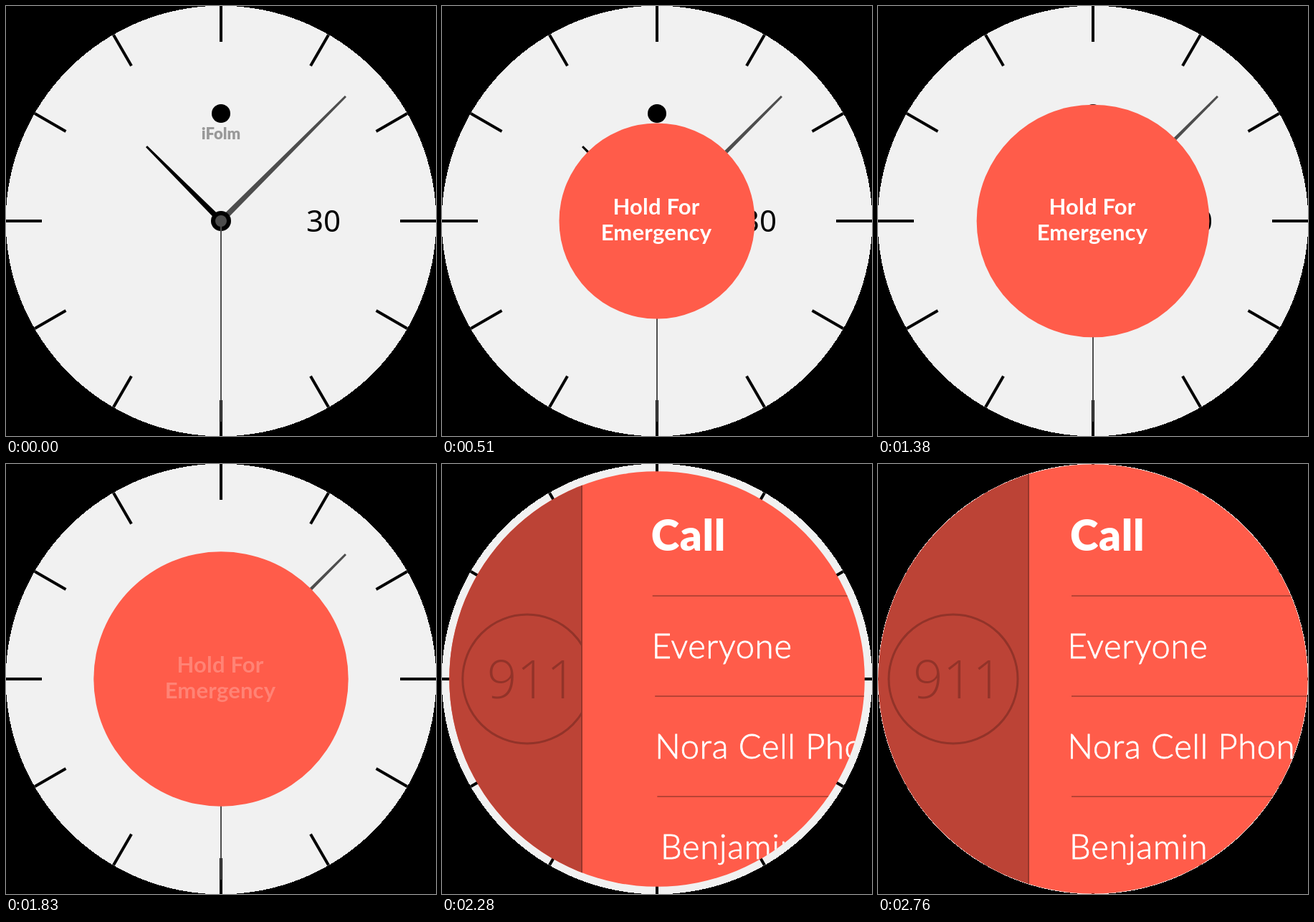
An HTML page that plays this animation: 600 px wide and 600 px high, repeating every 4500 ms.

```html
<!DOCTYPE html>
<html lang="en">
<head>
<meta charset="utf-8">
<title>Emergency watch face</title>
<style>
  html, body { margin: 0; width: 100%; height: 100%; overflow: hidden; background: #000; }
  svg { display: block; width: 100%; height: 100%; }
  text { font-family: Lato, sans-serif; }
  .middle { text-anchor: middle; }
  .title { font-size: 60px; font-weight: 900; letter-spacing: .7px; }
  .row { font-size: 47px; font-weight: 300; letter-spacing: .8px; stroke: #fff; stroke-width: .8px; }
  .number { font: 300 73px 'Open Sans', 'Noto Sans', sans-serif; }
  .rule { fill: #b94335; }
</style>
</head>
<body>
<svg viewBox="0 0 600 600">
  <defs>
    <clipPath id="reveal"><circle id="revealCircle" cx="300" cy="300" r="0"/></clipPath>
    <clipPath id="panelClip"><rect id="panelArea" width="0" height="600"/></clipPath>
  </defs>

  <circle cx="300" cy="300" r="300.3" fill="#f1f1f1" shape-rendering="crispEdges"/>
  <g id="ticks" stroke="#000" stroke-width="4"></g>
  <circle cx="300" cy="150" r="13"/>
  <text class="middle" x="300" y="186" font-size="22" font-weight="900" fill="#999">iFolm</text>
  <text class="middle" x="443" y="315" font-size="42" style="font-family:'Noto Sans',sans-serif">30</text>
  <path d="M296 300L298.5 54H301.5L304 300Z" fill="#4d4d4d" transform="rotate(45 300 300)"/>
  <path d="M296 300L298.5 153H301.5L304 300Z" transform="rotate(-45 300 300)"/>
  <circle cx="300" cy="300" r="14"/>
  <circle cx="300" cy="300" r="8" fill="#4d4d4d"/>
  <path d="M300 300V580" stroke="#4d4d4d" stroke-width="2"/>

  <g clip-path="url(#reveal)">
    <rect width="600" height="600" fill="#ff5c4a"/>
    <g id="prompt" class="middle" fill="#fff" font-size="31" font-weight="700" letter-spacing=".2">
      <text x="299" y="291">Hold For</text>
      <text x="299" y="327">Emergency</text>
    </g>
    <g clip-path="url(#panelClip)">
      <rect width="600" height="600" fill="#bc4336"/>
      <g id="dial" fill="#923329">
        <circle cx="105" cy="300" r="90" fill="none" stroke="#923329" stroke-width="3"/>
        <text class="number" x="49" y="327">911</text>
      </g>
    </g>
    <rect id="panelEdge" width="2" height="600" fill="#96362b"/>
    <g fill="#fff">
      <text data-delay="0" class="title" x="268" y="121">Call</text>
      <rect data-delay="0" class="rule" x="270" y="183" width="400" height="2"/>
      <text data-delay="27" class="row" x="264.5" y="271">Everyone</text>
      <rect data-delay="21" class="rule" x="270" y="323" width="400" height="2"/>
      <text data-delay="50" class="row" x="264.5" y="411">Nora Cell Phone</text>
      <rect data-delay="38" class="rule" x="270" y="463" width="400" height="2"/>
      <text data-delay="73" class="row" x="267" y="551">Benjamin</text>
    </g>
  </g>
</svg>
<script>
const LOOP = 4500, STEP = 30;
const BUTTON_RADIUS = 162.3, FULL_RADIUS = 299.6, GROW_TIME = 850;
const OPEN_START = 1340, OPEN_TIME = 1360, FADE_TIME = 880;
const byId = id => document.getElementById(id);
const slides = [...document.querySelectorAll('[data-delay]')];

byId('ticks').innerHTML = Array.from({ length: 12 }, (_, i) =>
  `<path d="M300 0V50" transform="rotate(${i * 30} 300 300)"/>`).join('');

// Symmetric cubic Bezier ease (.86, 0, .14, 1), solved by bisection.
function ease(x) {
  if (x <= 0) return 0;
  if (x >= 1) return 1;
  const bezier = (s, a, b) => 3 * (1 - s) ** 2 * s * a + 3 * (1 - s) * s * s * b + s ** 3;
  let low = 0, high = 1;
  for (let i = 0; i < 30; i++) {
    const mid = (low + high) / 2;
    if (bezier(mid, 0.86, 0.14) < x) low = mid; else high = mid;
  }
  return bezier(low, 0, 1);
}

const shift = (element, dx) => element.setAttribute('transform', `translate(${dx} 0)`);

function render(t) {
  const opened = delay => ease((t - OPEN_START - delay) / OPEN_TIME);
  const open = opened(0);
  const panelWidth = Math.round(211 * open);

  byId('revealCircle').setAttribute('r',
    BUTTON_RADIUS * ease(t / GROW_TIME) + (FULL_RADIUS - BUTTON_RADIUS) * open);
  byId('prompt').setAttribute('opacity', 1 - ease((t - OPEN_START) / FADE_TIME));
  byId('panelArea').setAttribute('width', panelWidth);
  shift(byId('panelEdge'), panelWidth - 2);
  shift(byId('dial'), 193 * (1 - open));
  for (const item of slides) shift(item, 332 * (1 - opened(+item.dataset.delay)));
}

const start = performance.now();
function frame() {
  const elapsed = (performance.now() - start) % LOOP;
  render(Math.floor(elapsed / STEP) * STEP);
  requestAnimationFrame(frame);
}
frame();
</script>
</body>
</html>
```
